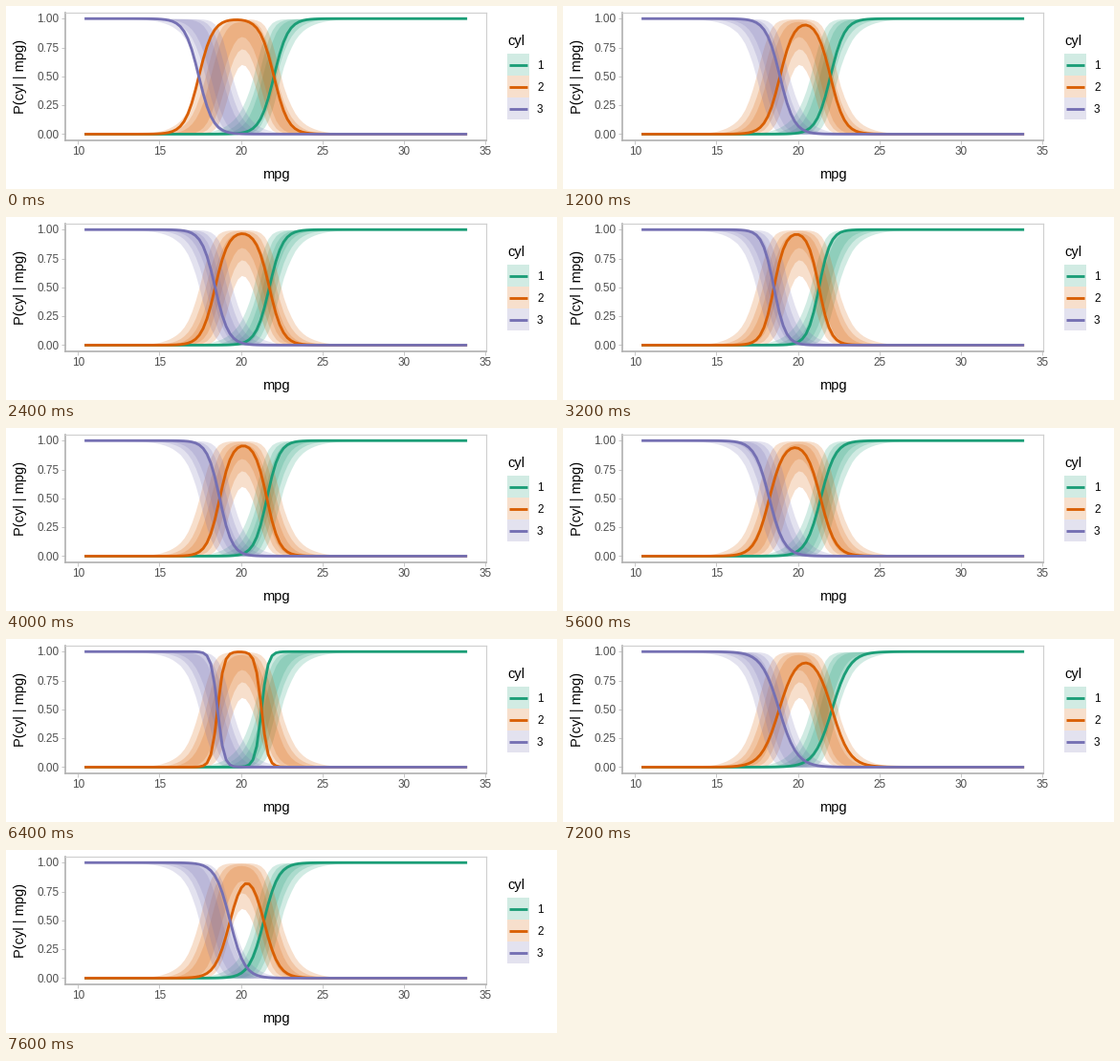
A matplotlib script that plays this animation: 576x192 px, repeating every 8 s.

```python
import numpy as np
import matplotlib.pyplot as plt
from matplotlib.animation import FuncAnimation
from matplotlib.patches import Rectangle

W, H, DPI = 576, 192, 96
COLORS = ["#1b9e77", "#d95f02", "#7570b3"]
LINE = 2.13
GREY = "#b3b3b3"
LEFT, RIGHT, TOP, BOTTOM = 62.1, 502.1, 7.2, 140.5

# One posterior draw per step: lower cutpoint, upper cutpoint, slope
DRAWS = [
    (17.42, 22.03, 2.30), (18.40, 21.80, 2.50), (18.70, 21.60, 2.60),
    (18.90, 22.00, 2.30), (17.50, 21.30, 1.90), (18.00, 21.50, 2.10),
    (18.42, 21.75, 2.42), (17.90, 20.95, 1.18), (18.53, 21.30, 2.80),
    (18.90, 21.90, 3.20), (18.70, 21.60, 2.60), (18.50, 22.10, 1.42),
    (18.78, 22.42, 1.39), (18.50, 21.50, 2.60), (18.25, 21.40, 2.20),
    (18.20, 21.20, 2.30), (18.57, 21.27, 5.10), (18.30, 21.30, 1.83),
    (18.85, 22.10, 1.83), (19.33, 21.42, 2.22),
]

plt.rcParams["font.family"] = "Liberation Sans"


def probabilities(x, low, high, slope):
    """Class probabilities of an ordered logit model."""
    third = 1 / (1 + np.exp(slope * (x - low)))
    first = 1 / (1 + np.exp(slope * (high - x)))
    return first, 1 - first - third, third


mpg = np.linspace(10.4, 33.9, 101)
rng = np.random.default_rng(4)
n = 6000
posterior = probabilities(
    mpg,
    rng.normal(18.46, 0.52, (n, 1)),
    rng.normal(21.6, 0.43, (n, 1)),
    np.exp(rng.normal(np.log(2.3), 0.36, (n, 1))),
)

fig = plt.figure(figsize=(W / DPI, H / DPI), dpi=DPI, facecolor="white")

# Page layer in pixels, with y pointing down
page = fig.add_axes([0, 0, 1, 1])
page.set(xlim=(0, W), ylim=(H, 0))
page.axis("off")

panel = fig.add_axes([LEFT / W, 1 - BOTTOM / H, (RIGHT - LEFT) / W, (BOTTOM - TOP) / H])
panel.set(xlim=(9.225, 35.075), ylim=(-0.05, 1.05),
          xticks=range(10, 36, 5), yticks=np.linspace(0, 1, 5))
panel.tick_params(length=2.75, width=0.54, color=GREY, labelbottom=False, labelleft=False)
for side, spine in panel.spines.items():
    main = side in ("left", "bottom")
    spine.set(color=GREY if main else "#d0d0d0", linewidth=1.3 if main else 0.9)


def label(x, y, text, size=8.8, color="black", **kw):
    page.text(x, y, text, fontsize=size, color=color, va="baseline", **kw)


for value in range(10, 36, 5):
    px = LEFT + (value - 9.225) / 25.85 * (RIGHT - LEFT)
    label(px, 156.4, str(value), color="#4d4d4d", ha="center")
for value in np.linspace(0, 1, 5):
    py = BOTTOM - (value + 0.05) / 1.1 * (BOTTOM - TOP)
    label(55.5, py + 4.2, f"{value:.2f}", color="#4d4d4d", ha="right")
label(282.3, 180.5, "mpg", 11, ha="center")
label(18.5, 73.8, "P(cyl | mpg)", 11, ha="center", rotation=90, rotation_mode="anchor")
label(524, 41, "cyl", 11)

for i, color in enumerate(COLORS):
    y = 50 + 23.04 * i
    page.add_patch(Rectangle((524, y), 23.04, 23.04, color=color, alpha=0.2, lw=0))
    page.plot([526.3, 544.7], [y + 11.5] * 2, color=color, lw=LINE, solid_capstyle="butt")
    label(555, y + 15.7, str(i + 1))

for probs, color in zip(posterior, COLORS):
    for width in (0.95, 0.8, 0.5):
        lower, upper = np.quantile(probs, [0.5 - width / 2, 0.5 + width / 2], axis=0)
        panel.fill_between(mpg, lower, upper, color=color, alpha=0.2, lw=0)

curves = [panel.plot([], [], color=c, lw=LINE, solid_capstyle="butt", zorder=3)[0]
          for c in COLORS]


def update(step):
    for curve, p in zip(curves, probabilities(mpg, *DRAWS[step])):
        curve.set_data(mpg, p)
    return curves


anim = FuncAnimation(fig, update, frames=len(DRAWS), interval=400, repeat=True, repeat_delay=0)
plt.show()
```
